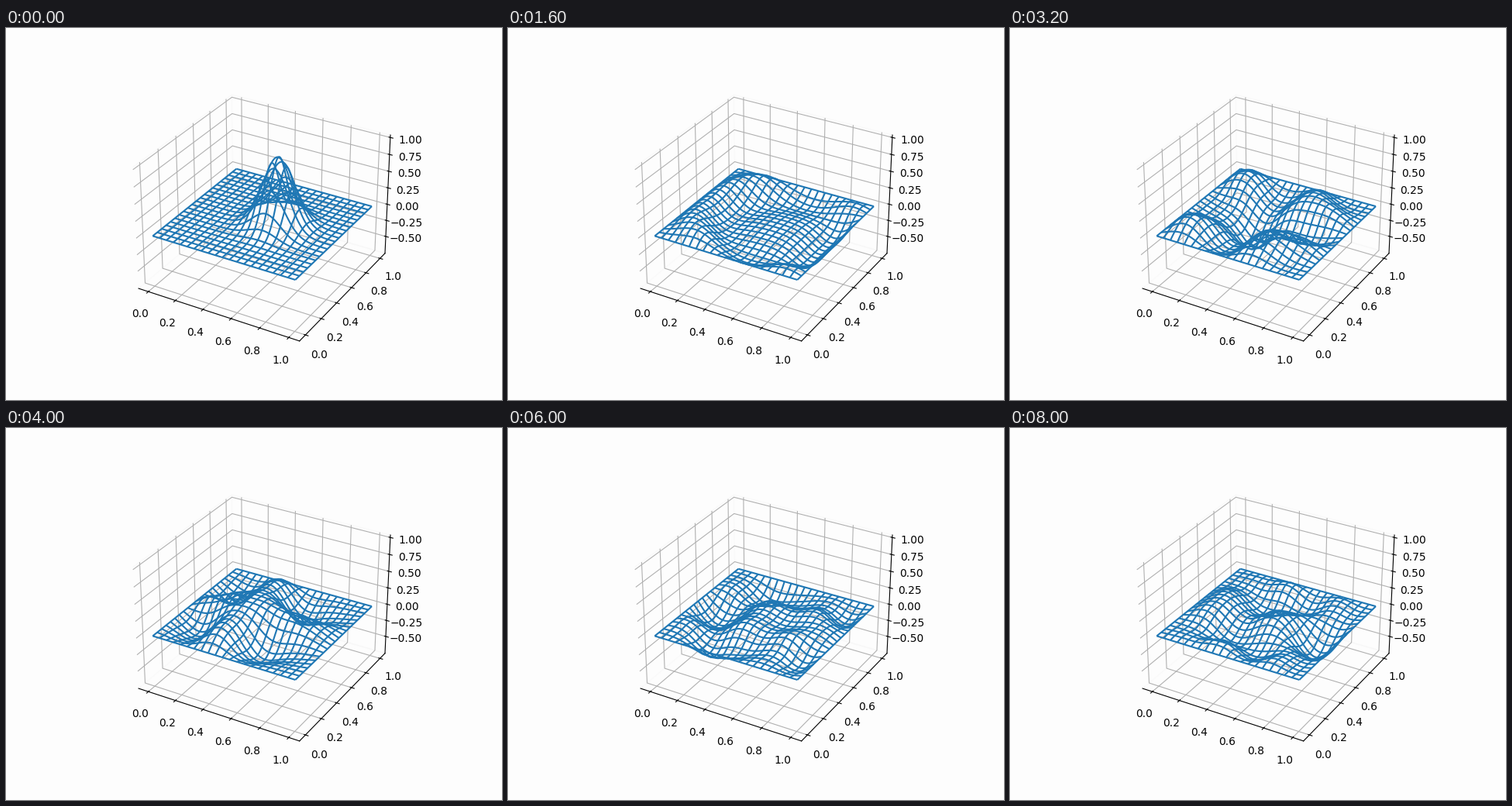
Write a matplotlib script that moves like this. It is 640 px wide and 480 px high and loops after 8.2 s.

```python
import numpy as np
import matplotlib.pyplot as plt
from matplotlib.animation import FuncAnimation

FRAMES, INTERVAL = 41, 200
STEP = 0.06           # distance a wave travels per frame
CENTER = (0.6, 0.5)
SIGMA = 0.1
MODES = 30
PAPER = "#fdfdfd"

# Square membrane with fixed rim, solved as a sum of standing waves.
s = np.linspace(0, 1, 101)
X, Y = np.meshgrid(s, s)
k = np.pi * np.arange(1, MODES + 1)
basis = np.sin(np.outer(s, k))


def coeffs(c):
    return 2 * np.exp(-(s - c) ** 2 / (2 * SIGMA ** 2)) @ basis * (s[1] - s[0])


amp = np.outer(coeffs(CENTER[1]), coeffs(CENTER[0]))
omega = np.hypot(k[:, None], k[None, :])


def height(t):
    return basis @ (amp * np.cos(omega * t)) @ basis.T


def padded(lo, hi):
    pad = (hi - lo) / 48
    return lo - pad, hi + pad


fig = plt.figure(figsize=(6.4, 4.8), dpi=100, facecolor=PAPER)
ax = fig.add_subplot(projection="3d", facecolor=PAPER)
ax.set_xlim(*padded(-0.05, 1.05), view_margin=0)
ax.set_ylim(*padded(-0.05, 1.05), view_margin=0)
ax.set_zlim(*padded(-0.73, 1), view_margin=0)
ax.set_zticks(np.arange(-0.5, 1.01, 0.25))
for axis in (ax.xaxis, ax.yaxis, ax.zaxis):
    axis.pane.set_facecolor(PAPER)
    axis.pane.set_edgecolor("#f6f6f6")

mesh = None


def draw(i):
    global mesh
    if mesh is not None:
        mesh.remove()
    mesh = ax.plot_wireframe(X, Y, height(STEP * i), rstride=5, cstride=5)
    return mesh,


anim = FuncAnimation(fig, draw, frames=FRAMES, interval=INTERVAL,
                     init_func=lambda: (), repeat=True, repeat_delay=0)
plt.show()
```
